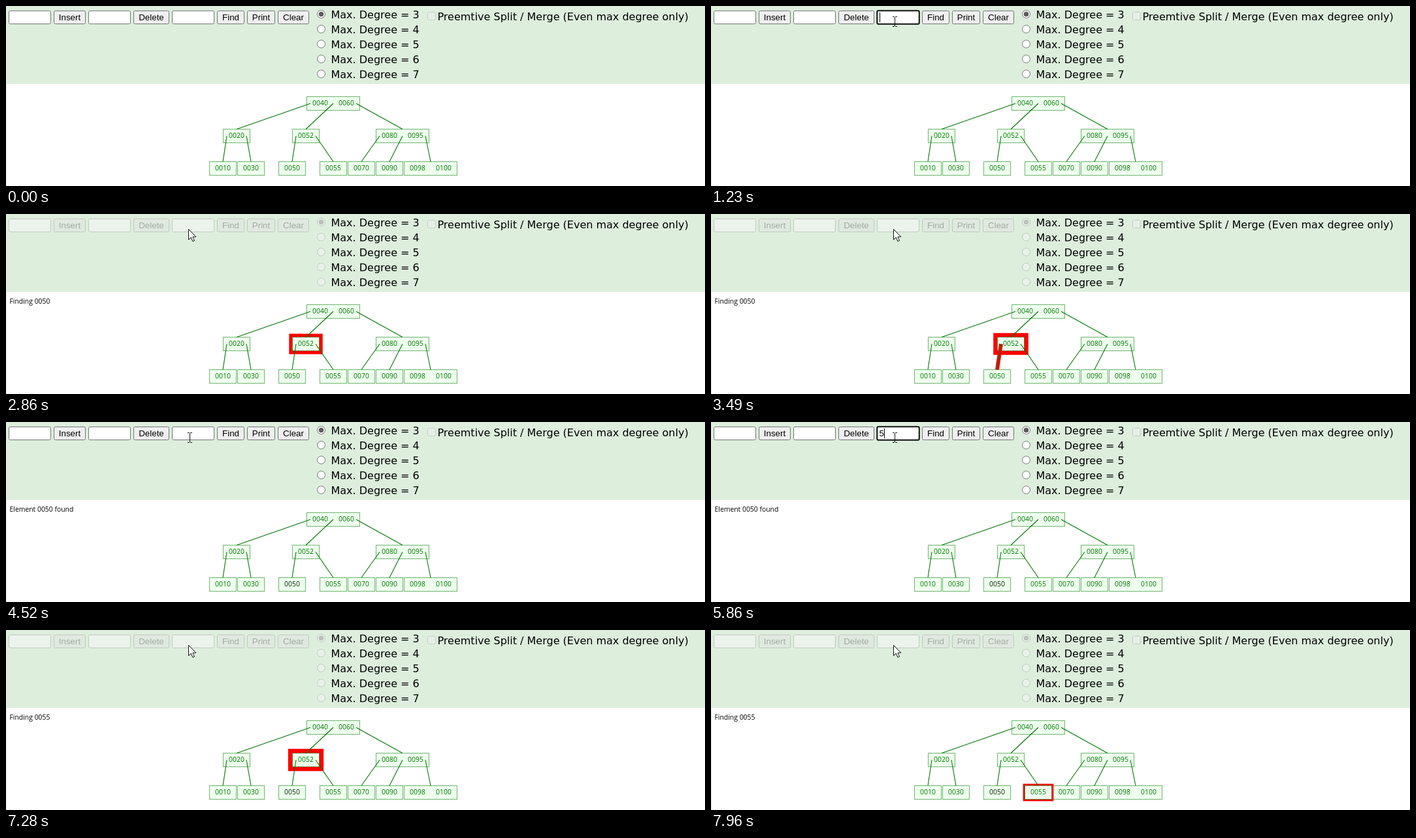
An HTML page that plays this animation: 1070x277 px, repeating every 8000 ms.

```html
<!DOCTYPE html>
<html lang="en">
<head>
<meta charset="utf-8">
<title>B-tree search</title>
<style>
html, body { margin: 0; width: 100%; height: 100%; overflow: hidden; background: #fff; }
svg { display: block; width: 1070px; height: 277px; }
.ui { font: 13.333px "Liberation Sans", Arial, sans-serif; }
.label { font: 16px "DejaVu Sans", Verdana, sans-serif; }
.tree { font: 10.4px "Open Sans", "Noto Sans", sans-serif; }
</style>
</head>
<body>
<svg id="stage" viewBox="0 0 1070 277" xmlns="http://www.w3.org/2000/svg"></svg>
<script>
const LOOP = 8000;
const NS = "http://www.w3.org/2000/svg";
const stage = document.getElementById("stage");

function set(el, attrs) {
  for (const name in attrs) el.setAttribute(name, attrs[name]);
  return el;
}
function add(parent, tag, attrs, text) {
  const el = set(document.createElementNS(NS, tag), attrs);
  if (text) el.textContent = text;
  parent.appendChild(el);
  return el;
}
const show = (el, on) => el.setAttribute("visibility", on ? "visible" : "hidden");
const between = (t, a, b) => t >= a && t < b;

// Toolbar
add(stage, "rect", { width: 1070, height: 277, fill: "#fff" });
add(stage, "rect", { width: 1070, height: 120, fill: "#ddeedd" });
add(stage, "rect", { width: 1, height: 277, fill: "#e4e6e4" });

const box = (x, right) => add(stage, "rect", { x: x + 0.5, y: 7.5, width: right - x - 1, height: 20, rx: 2 });
const fields = [[4, 69], [126, 191], [254, 319]].map(([x, r]) => box(x, r));
const buttons = [["Insert", 73, 122], ["Delete", 195, 250], ["Find", 323, 365], ["Print", 369, 412], ["Clear", 416, 464]]
  .map(([name, x, r]) => ({
    rect: box(x, r),
    text: add(stage, "text", { x: (x + r) / 2, y: 22, "text-anchor": "middle", class: "ui" }, name)
  }));

const radios = [3, 4, 5, 6, 7].map((degree, i) => {
  const y = 13 + 23 * i;
  add(stage, "text", { x: 497.5, y: y + 6, class: "label" }, "Max. Degree = " + degree);
  return add(stage, "circle", { cx: 482.5, cy: y - 0.5, r: 6 });
});
const radioDot = add(stage, "circle", { cx: 482.5, cy: 12.5, r: 3.8 });

add(stage, "rect", { x: 645.5, y: 9.5, width: 12, height: 12, rx: 2, fill: "#e6efe6", stroke: "#c3cdc3" });
add(stage, "text", { x: 660.5, y: 22, class: "label" }, "Preemtive Split / Merge (Even max degree only)");

const focusRing = add(stage, "rect", { x: 254.25, y: 7.25, width: 64.5, height: 20.5, rx: 2, fill: "#fff", stroke: "#101010", "stroke-width": 2 });
const typed = add(stage, "text", { x: 257.5, y: 22, class: "ui" });
const caret = add(stage, "rect", { y: 10, width: 1, height: 15 });

// Tree
const NODE_STYLE = { fill: "#eeffee", stroke: "#007700", "stroke-opacity": 0.55 };
const nodes = {};
const nodeLayer = add(stage, "g", {});
const glowLayer = add(stage, "g", {});
const edgeLayer = add(stage, "g", {});
const textLayer = add(stage, "g", { class: "tree", "text-anchor": "middle", fill: "#007700" });

function addNode(x, y, ...keys) {
  const node = { x, y, w: 2 + 40 * keys.length, labels: [] };
  node.rect = { x: x + 0.5, y: y + 0.5, width: node.w - 1, height: 21 };
  add(nodeLayer, "rect", { ...node.rect, ...NODE_STYLE });
  keys.forEach((key, i) => {
    node.labels.push(add(textLayer, "text", { x: x + 21 + 40 * i, y: y + 14 }, key));
  });
  nodes[keys[0]] = node;
}
addNode(460, 139, "0040", "0060");
addNode(332, 189, "0020");
addNode(438, 189, "0052");
addNode(566, 189, "0080", "0095");
addNode(311, 239, "0010");
addNode(354, 239, "0030");
addNode(417, 239, "0050");
addNode(480, 239, "0055");
addNode(523, 239, "0070");
addNode(566, 239, "0090");
addNode(609, 239, "0098", "0100");

const edges = {};
function connect(parent, ...children) {
  const p = nodes[parent];
  children.forEach((child, i) => {
    const c = nodes[child];
    const line = {
      x1: p.x + 6 + (p.w - 12) * i / (children.length - 1), y1: p.y + 11,
      x2: c.x + c.w / 2, y2: c.y + 0.5
    };
    edges[child] = line;
    add(edgeLayer, "line", { ...line, stroke: "#007700", "stroke-width": 1.1 });
  });
}
const thickEdge = add(edgeLayer, "line", { stroke: "#f00" });
connect("0040", "0020", "0052", "0080");
connect("0020", "0010", "0030");
connect("0052", "0050", "0055");
connect("0080", "0070", "0090", "0098");

const glow = add(glowLayer, "rect", { fill: "#f00" });
const glowNode = add(glowLayer, "rect", NODE_STYLE);
const message = add(stage, "text", { x: 5.5, y: 138, class: "tree" });

// Pointers, drawn around their hot spot
const arrow = add(stage, "path", {
  d: "M0 0V16L3.8 12.5L6.4 18.6L9 17.5L6.4 11.6H11.4Z",
  fill: "#fff", stroke: "#111", "stroke-width": 1
});
const beam = add(stage, "path", {
  d: "M278 16.5H280.5L281.5 17.5L282.5 16.5H285M281.5 17.5V30.5M278 31.5H280.5L281.5 30.5L282.5 31.5H285",
  fill: "none", stroke: "#111"
});

// Each visit: time, highlighted node, edge followed from it
const visits = [
  [2160, "0040"], [2370, "0040", "0052"],
  [2720, "0052"], [3105, "0052", "0050"],
  [3530, "0050"], [4320],
  [6320, "0040"], [6680, "0040", "0052"],
  [7140, "0052"], [7500, "0052", "0055"],
  [7860, "0055"]
];
const messages = [[0, ""], [2160, "Finding 0050"], [3900, "Element 0050 found"], [6320, "Finding 0055"]];
const typing = [[0, ""], [1700, "5"], [1830, "50"], [2160, ""], [5860, "5"], [6040, "55"], [6320, ""]];
const latest = (list, t) => list.filter(item => item[0] <= t).pop() || [];

// The glow swells and shrinks between 2 and 7 px, one px per 180 ms
function glowSize(t) {
  const peak = t < 5000 ? 3274 : 7126;
  const phase = Math.abs(t - peak) % 1800;
  return 7 - Math.min(phase, 1800 - phase) / 180;
}

function drawControls(t, busy) {
  const border = busy ? "#bec9be" : "#767676";
  fields.forEach(f => set(f, { fill: busy ? "#ecf2ec" : "#fff", stroke: border }));
  buttons.forEach(b => {
    set(b.rect, { fill: busy ? "#e0e9e0" : "#efefef", stroke: border });
    set(b.text, { fill: busy ? "#a1aba1" : "#000" });
  });
  radios.forEach(r => set(r, { fill: busy ? "#e8f1e8" : "#fff", stroke: border }));
  set(radioDot, { fill: busy ? "#b9c3b9" : "#5c5c5c" });

  const focused = between(t, 1100, 2160) || between(t, 5180, 6320);
  const text = latest(typing, t)[1];
  const blink = between(t, 1630, 1700) || between(t, 5640, 5860);
  show(focusRing, focused);
  typed.textContent = text;
  set(caret, { x: 258 + Math.round(7.4 * text.length) });
  show(caret, focused && !blink);
}

function drawPointer(t, busy) {
  const p = Math.min(1, Math.max(0, (t - 260) / 770));
  const eased = p * p * (3 - 2 * p);
  const overField = p >= 0.97;
  const x = busy ? 279.5 : 213.5 + 67 * eased;
  const y = busy ? 23.5 : 234 - 210 * eased;
  set(arrow, { transform: `translate(${x} ${y})` });
  show(arrow, t >= 260 && (busy || !overField));
  show(beam, overField && !busy);
}

function drawTree(t) {
  const [, key, child] = latest(visits, t);
  const size = glowSize(t);
  show(glow, key);
  show(glowNode, key);
  show(thickEdge, child);
  if (key) {
    const n = nodes[key];
    set(glow, { x: n.x - size, y: n.y - size, width: n.w + 2 * size, height: 22 + 2 * size });
    set(glowNode, n.rect);
  }
  if (child) set(thickEdge, { ...edges[child], "stroke-width": size });
  set(nodes["0050"].labels[0], { fill: t >= 4320 ? "#0c220c" : "#007700" });
  message.textContent = latest(messages, t)[1];
}

function render(t) {
  const busy = between(t, 2160, 4320) || t >= 6320;
  drawControls(t, busy);
  drawTree(t);
  drawPointer(t, busy);
}

const start = performance.now();
function tick(now) {
  render(Math.max(0, now - start) % LOOP);
  requestAnimationFrame(tick);
}
render(0);
requestAnimationFrame(tick);
</script>
</body>
</html>
```
